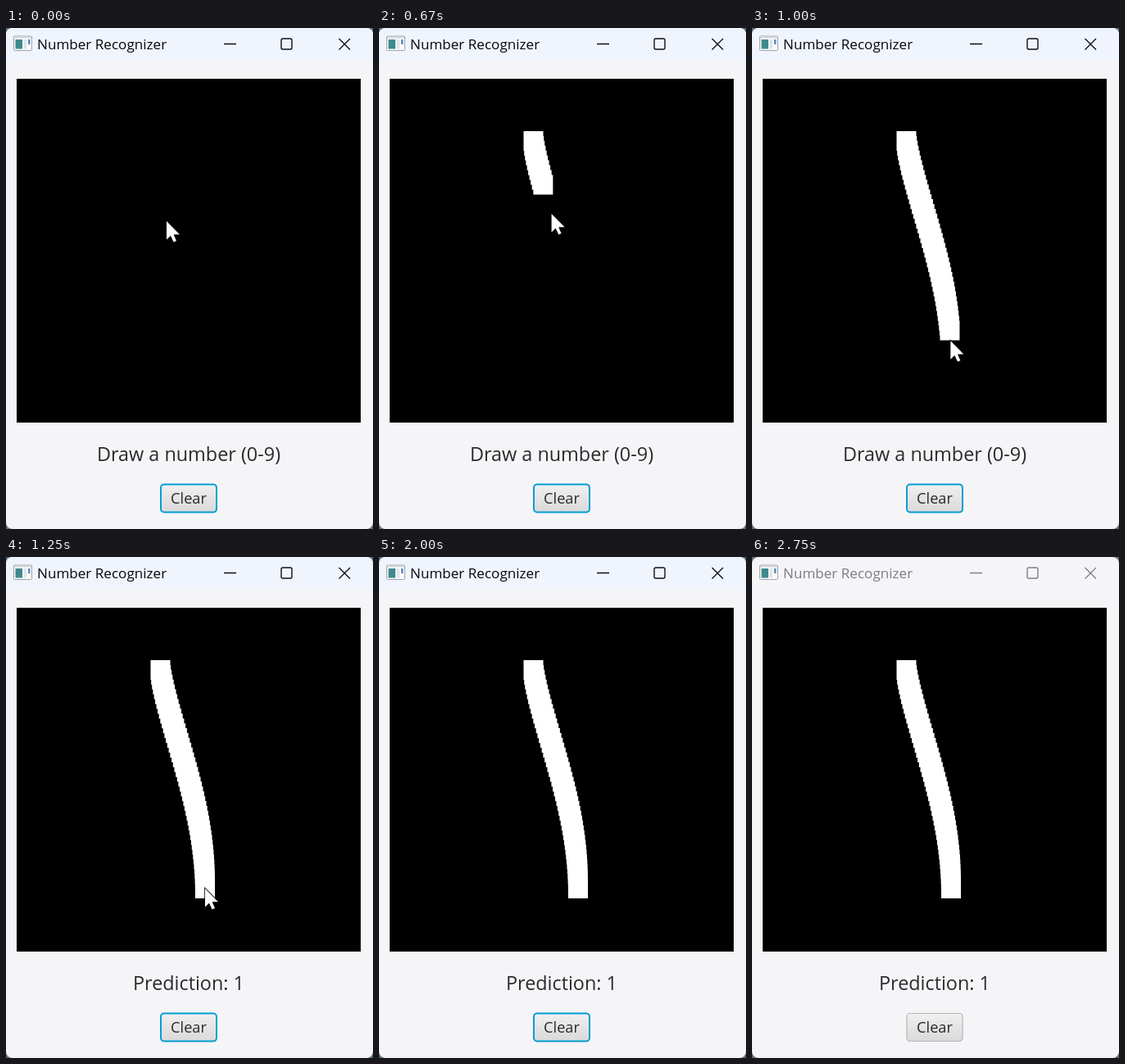
Write an HTML page that moves like this. It is 448x612 px and loops after 2830 ms.

```html
<!DOCTYPE html>
<html lang="en">
<head>
<meta charset="utf-8">
<title>Number Recognizer</title>
<style>
  html, body { margin: 0; width: 100%; height: 100%; overflow: hidden; background: #5f6e7c; }
  svg { display: block; }
  text { font-family: "Open Sans", "Noto Sans", sans-serif; fill: #2b2b2d; }
</style>
</head>
<body>
<svg width="448" height="612" viewBox="0 0 448 612">
  <defs>
    <linearGradient id="face" x2="0" y2="1">
      <stop offset="0" stop-color="#f0f0f1"/>
      <stop offset="1" stop-color="#d9d9db"/>
    </linearGradient>
    <clipPath id="frame"><rect width="448" height="612" rx="8"/></clipPath>
  </defs>

  <g clip-path="url(#frame)">
    <rect width="448" height="612" fill="#f5f5f8"/>
    <rect id="bar" width="448" height="40" fill="#eff4fd"/>
  </g>

  <!-- window icon -->
  <rect x="9.5" y="10" width="22" height="17.5" rx="1" fill="#fafafb" stroke="#a0a4a8"/>
  <path d="M10 10.5H31V12.5H10Z" fill="#d3d7dc"/>
  <path d="M11.5 14H20V25.5H11.5Z" fill="#3f8a8c"/>
  <path d="M22 14H25V25.5H22Z" fill="#dfe5e6"/>
  <path d="M27 14H29.5V20H27Z" fill="#5b8cc4"/>

  <g id="caption">
    <text x="38" y="26" font-size="17.1" style="fill:#08080a">Number Recognizer</text>
    <g fill="none" stroke="#101014" stroke-width="1.4">
      <path d="M266 19.5H281M406.5 13L420 26.5M420 13L406.5 26.5"/>
      <rect x="336" y="13" width="13" height="13" rx="2"/>
    </g>
  </g>

  <rect x="13" y="62" width="420" height="420"/>
  <path id="ink" fill="#fff"/>

  <text id="label" x="223" y="529" font-size="23.4" text-anchor="middle"></text>
  <rect id="button" x="189" y="557.5" width="68" height="34" rx="4" fill="url(#face)"/>
  <text x="223" y="581" font-size="18.2" text-anchor="middle">Clear</text>

  <path id="cursor" d="M0 0V22.5L5 17.7L8.6 25.4L12 24L8.6 16.3H16Z"
        fill="#fff" stroke="#000" stroke-width="1.6" paint-order="stroke"/>
</svg>

<script>
const $ = id => document.getElementById(id);
const LOOP = 2830, FPS = 12;
const BRUSH = 24, STAMPS = 45;
const PRESS = 7, RELEASE = 14, LEAVE = 21, GONE = 24; // in ticks

const clamp = v => Math.min(1, Math.max(0, v));
const easeOut = (p, power) => 1 - (1 - clamp(p)) ** power;
const mix = (a, b, p) => a.map((v, i) => v + (b[i] - v) * p);

// the drawn digit: a leaning S from top to bottom
const curve = s => [188.5 + 54.5 * Math.sin(s * Math.PI / 2) ** 1.3, 138 + 267 * s];
const sweep = tick => easeOut((tick - 6.55) / (RELEASE - 6.55), 1.87);

function pointer(tick) {
  if (tick < PRESS) return mix([196, 236], curve(0), easeOut(tick / 5.5, 3));
  if (tick <= LEAVE) return curve(sweep(tick));
  return mix(curve(1), [290, 500], ((tick - LEAVE) / 2) ** 2);
}

// square stamps along the curve, trailing the pointer a little
function stroke(tick) {
  if (tick < PRESS) return "";
  const count = Math.round(sweep(tick - 0.6) * STAMPS);
  let d = "";
  for (let i = 0; i <= count; i++) {
    const [x, y] = curve(i / STAMPS);
    d += `M${x - BRUSH / 2} ${y - BRUSH / 2}h${BRUSH}v${BRUSH}h${-BRUSH}z`;
  }
  return d;
}

function draw(t) {
  const tick = Math.floor((t + 4) * FPS / 1000);
  $("cursor").setAttribute("transform", `translate(${pointer(tick)})`);
  $("cursor").setAttribute("visibility", tick < GONE ? "visible" : "hidden");
  $("ink").setAttribute("d", stroke(tick));
  $("label").textContent = tick > RELEASE ? "Prediction: 1" : "Draw a number (0-9)";

  // the window loses focus over the last two ticks
  const blur = clamp((tick - 31) / 2);
  $("bar").setAttribute("opacity", 1 - blur);
  $("caption").setAttribute("opacity", 1 - blur / 2);
  $("button").setAttribute("stroke", blur ? "#b6b6b9" : "#039ed3");
  $("button").setAttribute("stroke-width", blur ? 1.2 : 2);
}

const start = performance.now();
function play() {
  draw((performance.now() - start) % LOOP);
  requestAnimationFrame(play);
}
play();
</script>
</body>
</html>
```
